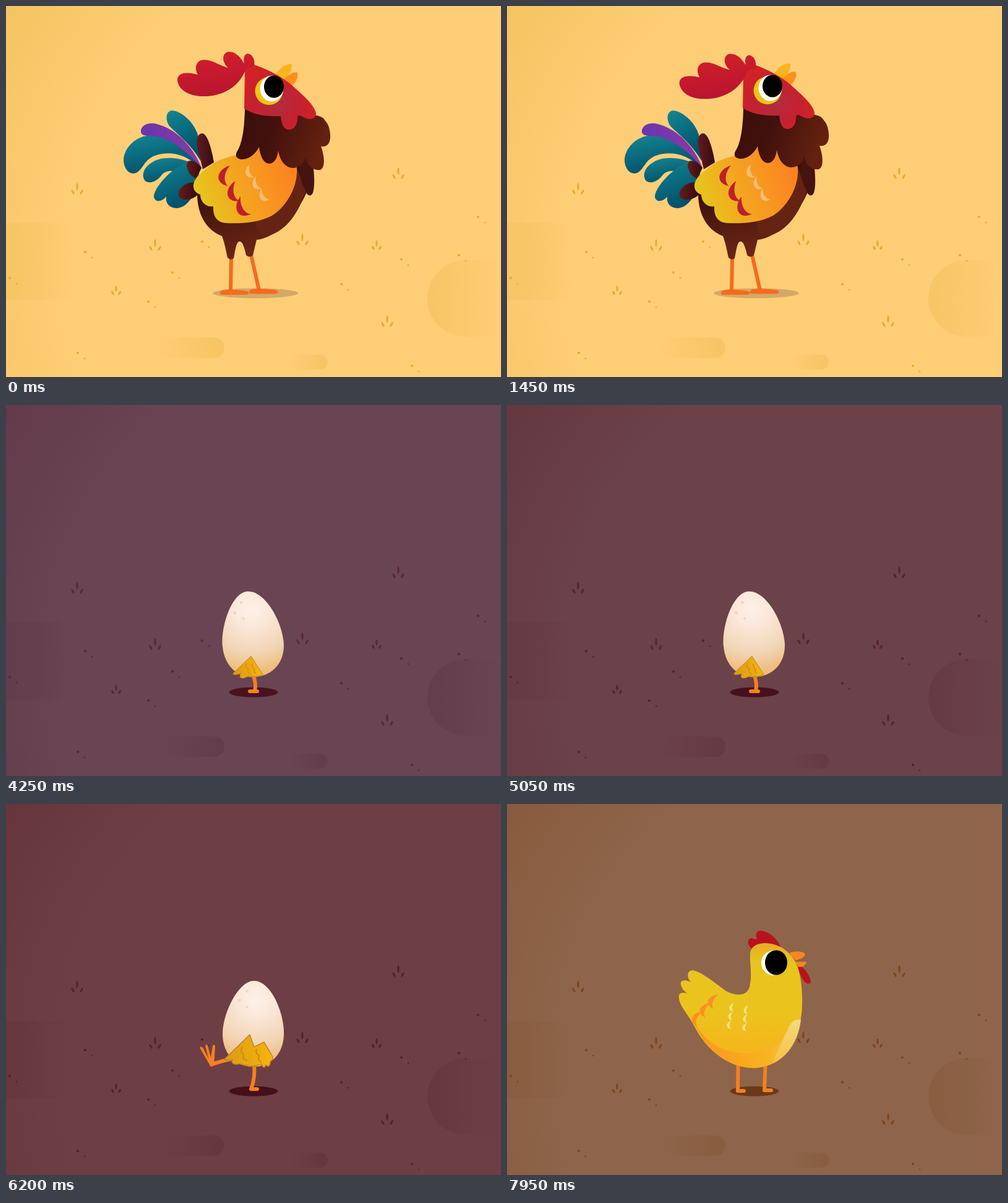
Recreate the animation shown at these times as an HTML page. Size 800 by 600 pixels, loop 8000 ms.

```html
<!DOCTYPE html>
<html lang="en">
<head>
<meta charset="utf-8">
<title>Rooster, egg, hen</title>
<style>
html, body { margin: 0; width: 100%; height: 100%; overflow: hidden; }
svg { display: block; width: 800px; height: 600px; background: var(--ground); }
.edge { stop-color: var(--edge); }
.patch { stop-color: var(--patch); }
#marks { fill: var(--mark); }
#shade { fill: var(--shade); }
.leg { fill: none; stroke: #f5801f; stroke-width: 6; stroke-linecap: round; stroke-linejoin: round; }
</style>
</head>
<body>
<svg id="stage" viewBox="0 0 800 600">
<defs>
  <radialGradient id="vignette" gradientUnits="userSpaceOnUse" cx="620" cy="420" r="760">
    <stop class="edge" offset=".7" stop-opacity="0"/><stop class="edge" offset="1"/>
  </radialGradient>
  <linearGradient id="fadeR"><stop class="patch" offset="0"/><stop class="patch" offset="1" stop-opacity="0"/></linearGradient>
  <linearGradient id="fadeL"><stop class="patch" offset="0" stop-opacity="0"/><stop class="patch" offset=".9"/></linearGradient>
  <linearGradient id="teal" x2=".4" y2="1"><stop offset="0" stop-color="#168692"/><stop offset="1" stop-color="#00516c"/></linearGradient>
  <linearGradient id="violet"><stop offset="0" stop-color="#6a35ae"/><stop offset="1" stop-color="#8a3aa4"/></linearGradient>
  <linearGradient id="plume"><stop offset="0" stop-color="#651b1c"/><stop offset="1" stop-color="#330c11"/></linearGradient>
  <linearGradient id="belly" x2=".3" y2="1"><stop offset=".3" stop-color="#360c0c"/><stop offset="1" stop-color="#6b2614"/></linearGradient>
  <linearGradient id="wing" gradientUnits="userSpaceOnUse" x1="305" y1="320" x2="460" y2="262"><stop offset="0" stop-color="#e4cb1c"/><stop offset=".45" stop-color="#f4a520"/><stop offset="1" stop-color="#fc8320"/></linearGradient>
  <linearGradient id="ruff" x2="1" y2=".25"><stop offset="0" stop-color="#3a0d0c"/><stop offset=".45" stop-color="#42110d"/><stop offset="1" stop-color="#64210f"/></linearGradient>
  <radialGradient id="face" cx=".45" cy=".6" r=".55"><stop offset="0" stop-color="#ae2f40"/><stop offset=".6" stop-color="#c52030"/><stop offset="1" stop-color="#d02326"/></radialGradient>
  <linearGradient id="crest" x2=".2" y2="1"><stop offset="0" stop-color="#d51f2b"/><stop offset="1" stop-color="#b9152f"/></linearGradient>
  <radialGradient id="shell" gradientUnits="userSpaceOnUse" cx="402" cy="352" r="112"><stop offset="0" stop-color="#fff0e7"/><stop offset=".25" stop-color="#fbe8da"/><stop offset=".65" stop-color="#f1d4b3"/><stop offset="1" stop-color="#efb468"/></radialGradient>
  <linearGradient id="down" x2="1"><stop offset="0" stop-color="#dc9a12"/><stop offset="1" stop-color="#f6b50d"/></linearGradient>
  <linearGradient id="plumage" x2="0" y2="1"><stop offset="0" stop-color="#e6ab25"/><stop offset=".15" stop-color="#e8c41f"/><stop offset=".55" stop-color="#ecc31d"/><stop offset="1" stop-color="#f9b01c"/></linearGradient>
  <linearGradient id="under"><stop offset="0" stop-color="#fb9420"/><stop offset=".6" stop-color="#f8ae1e"/><stop offset="1" stop-color="#f5c441"/></linearGradient>
  <linearGradient id="bib" x2="0" y2="1"><stop offset="0" stop-color="#f3d97d"/><stop offset="1" stop-color="#f6c244"/></linearGradient>
  <filter id="smear" x="-.1" y="-.1" width="1.2" height="1.2"><feGaussianBlur stdDeviation="1.2 2.4"/></filter>
  <path id="crescent" d="M0 0C-22 7 -25 30 -2 33C-10 27 -10 12 0 0Z"/>
</defs>

<rect width="800" height="600" fill="url(#vignette)"/>
<rect y="351" width="110" height="125" fill="url(#fadeR)"/>
<path d="M800 411H743a62 62 0 0 0 0 124H800Z" fill="url(#fadeR)"/>
<rect x="246" y="536" width="107" height="33" rx="16.5" fill="url(#fadeL)"/>
<rect x="458" y="564" width="62" height="24" rx="12" fill="url(#fadeL)"/>
<g id="marks"></g>
<ellipse id="shade" cy="464.5" ry="8"/>

<g id="rooster">
  <g fill="url(#teal)">
    <path d="M310 208C302 184 280 169 268 169C257 171 258 185 264 194C276 207 298 222 314 250Z"/>
    <path d="M316 262C300 236 270 212 238 209C210 208 190 230 190 250C191 267 202 273 210 270C221 265 222 251 238 243C262 233 290 238 314 262Z"/>
    <path d="M313 262C292 245 255 240 236 253C222 261 218 275 225 283C234 289 245 282 251 274C258 265 266 266 280 268Z"/>
    <path d="M296 250C262 265 238 297 239 309C241 318 252 317 259 308C257 320 265 327 277 327C291 325 298 314 306 300L314 262Z"/>
  </g>
  <path d="M316 262C305 232 278 198 240 190C226 188 217 195 218 204C220 213 236 208 251 213C277 221 300 243 316 262Z" fill="url(#violet)"/>
  <g fill="url(#plume)">
    <path d="M317 206C308 206 306 220 312 240L318 264L336 253C333 234 326 206 317 206Z"/>
    <path d="M316 262C304 246 291 248 292 259C294 269 299 276 307 279Z"/>
    <path d="M304 285C288 285 276 298 279 307C284 317 302 314 310 305Z"/>
  </g>
  <path class="leg" style="stroke:#f46b20" d="M364 408L363 461M396 402L409 460"/>
  <g fill="#f46b20">
    <path id="foot" d="M346 463C347 459 355 459 362 458C375 460 392 459 393 464Q392 467 387 467H350Q345 467 346 463Z"/>
    <use href="#foot" x="47" y="-1.5"/>
  </g>
  <path d="M309 300C308 338 325 363 349 372C354 385 356 399 358 407Q363 412 368 408C370 398 371 389 374 383Q378 378 382 384C385 390 387 398 388 403Q394 408 399 403L405 378C442 376 488 320 497 265L490 232H390Z" fill="url(#belly)"/>
  <path d="M404 349C402 363 412 373 426 371C452 363 474 335 484 298L470 262C468 305 450 336 404 349Z" fill="#652413"/>
  <path d="M478 245L494 244C498 262 500 290 496 302C493 309 487 308 483 297C476 282 470 262 478 245Z" fill="#461410"/>
  <path d="M303 289C305 276 319 267 333 256C352 243 378 242 400 230C432 222 468 240 470 262C472 292 454 324 430 339C408 351 380 352 355 351C341 350 334 340 335 324C325 326 314 318 314 305C306 303 302 296 303 289Z" fill="url(#wing)"/>
  <g id="wingRed" fill="#bf1f2a"></g>
  <g id="wingTan" fill="#f5bd72"></g>
  <g id="head">
    <path d="M386 160C386 200 381 224 373 236C369 244 375 248 382 248C395 248 405 236 409 228C411 244 417 255 426 255C435 254 439 244 440 234C443 252 453 262 464 262C476 261 483 253 484 243C486 258 497 267 508 265C517 261 514 240 509 227C520 229 525 220 524 208C523 196 520 190 516 186C512 178 505 178 497 176Z" fill="url(#ruff)"/>
    <path d="M434 114C440 103 449 93 462 94C463 103 457 113 449 120Z" fill="#f8b41d"/>
    <path d="M448 120C455 112 463 107 470 107C474 113 469 124 460 131Z" fill="#fb8f1c"/>
    <path d="M386 104C388 95 396 93 404 96C426 104 446 114 463 129C482 146 498 160 501 173C502 184 489 185 479 179Q471 174 471 182C471 192 466 200 457 200C448 200 445 188 444 178C420 179 400 176 385 166Z" fill="url(#face)"/>
    <circle cx="425" cy="137.5" r="22.5" fill="#f0c413"/>
    <ellipse cx="429.5" cy="133.5" rx="19" ry="21" fill="#fff"/>
    <ellipse cx="433" cy="130.5" rx="16" ry="18"/>
  </g>
  <path id="comb" d="M388 102C375 134 347 147 316 146C290 145 277 131 277 119C278 107 293 106 310 111C303 98 309 87 320 87C334 87 344 96 359 100C347 89 350 75 360 74C373 74 380 85 385 93C383 83 386 77 391 77C399 78 403 88 401 97Z" fill="url(#crest)"/>
</g>

<g id="egg">
  <g id="shellBox">
    <path d="M398 323C426 323 449 375 449 409C449 441 428 462 399 462C371 462 350 441 350 408C350 375 373 323 398 323Z" fill="url(#shell)"/>
    <g fill="#f0d6c2"><circle cx="387" cy="340" r="2.3"/><circle cx="375" cy="355.5" r="2.5"/><circle cx="388" cy="366" r="2"/></g>
  </g>
  <path id="legA" class="leg" d="M399 436Q405 450 402 462M394 463H406"/>
  <g id="crackA">
    <path d="M396 406L368 433C364 437 372 437 380 434C374 443 384 444 392 438Q404 441 415 436Z" fill="url(#down)" stroke="#b98438"/>
    <path d="M389 417Q386 424 392 427Q389 433 396 435M398 418Q397 425 402 428Q400 432 404 434" fill="none" stroke="#d8890f" stroke-width="1.5"/>
  </g>
  <g id="crackB">
    <g id="kick"><path class="leg" d="M366 379Q346 383 333 388"/><path d="M331 392L313 361Q315 358 318 361L327 378L322 358Q324 354 326 358L331 377L334 358Q337 354 338 359L336 390Z" fill="#f5801f"/></g>
    <path class="leg" d="M401 388Q403 410 396 428H406"/>
    <path d="M394 340L353 380Q360 382 366 380C363 388 371 389 377 387Q388 391 400 391L413 388Q417 397 420 389Q426 395 427 384Q433 380 430 374L417 352L401 360Z" fill="url(#down)" stroke="#c1812b" stroke-width="1.5"/>
    <path d="M382 360Q377 368 384 372Q381 380 390 382M405 363Q402 370 409 374Q406 381 413 385" fill="none" stroke="#d58a0c" stroke-width="2"/>
  </g>
</g>

<g id="hen">
  <path class="leg" d="M373.5 422L373 464H383M417.5 422L416 463H427"/>
  <path d="M397 235C387 229 388 217 395 217L404 219C400 209 405 204 411 205C425 207 436 217 442 230L420 240Z" fill="#b8131d"/>
  <path d="M466 258C480 262 490 277 491 288C488 294 480 289 476 280Z" fill="#b8131d"/>
  <path d="M456 241C466 237 479 238 482 243C481 248 474 251 466 253ZM466 255L484 255C482 262 477 265 470 263Z" fill="#fa8620"/>
  <path d="M393 240C395 230 405 225 417 225C445 226 463 243 471 267C478 292 479 330 474 352C467 396 440 426 398 427C355 426 320 395 302 358C292 338 276 325 278 309C280 304 287 305 291 306C282 300 278 289 283 286C288 284 293 286 297 288C289 279 292 268 301 269C318 273 340 293 355 303C375 313 392 309 393 290C396 275 392 256 393 240Z" fill="url(#plumage)"/>
  <path d="M301 352C322 387 350 403 387 403C420 403 440 390 450 373L474 352C467 396 440 426 398 427C355 426 320 395 301 352Z" fill="url(#under)"/>
  <path d="M475 349C465 347 458 353 453 366C445 385 438 396 430 419C455 408 471 382 475 349Z" fill="url(#bib)"/>
  <g id="tailMarks" fill="#fa9022"></g>
  <g id="wingMarks" fill="#f7df87"></g>
  <circle cx="431" cy="257" r="20" fill="#fff"/>
  <ellipse cx="435" cy="256.5" rx="18" ry="20"/>
</g>
</svg>
<script>
const $ = id => document.getElementById(id);
const set = (id, name, value) => $(id).setAttribute(name, value);
const show = (id, on) => { $(id).style.display = on ? '' : 'none'; };
const lerp = (a, b, u) => a + (b - a) * u;
const LOOP = 8000, STEP = 50;

// Tufts are fans of three blades; pebbles come with a smaller one beside them
const tuft = ([x, y, size = 1]) => [-1, 0, 1].map(i =>
  `<ellipse rx="1.7" ry="${(6 - Math.abs(i) * 1.8) * size}" transform="translate(${x + i * 7 * size} ${y + Math.abs(i) * 9 * size}) rotate(${i * 28})"/>`).join('');
const pebble = ([x, y]) => `<circle cx="${x}" cy="${y}" r="2.1"/><circle cx="${x + 11}" cy="${y + 9}" r="1.3"/>`;
$('marks').innerHTML =
  [[115, 292], [634, 267], [241, 383], [479, 374], [178, 457, .8], [599, 384, .8], [616, 506]].map(tuft).join('') +
  [[128, 398], [6, 440], [269, 431], [230, 478], [317, 381], [116, 561], [542, 450], [639, 410], [732, 403], [763, 341], [656, 582]].map(pebble).join('');

// A row of crescents, each moved and turned a little further than the last
function crescents(id, x, y, dx, dy, scale, turn, dTurn) {
  for (let i = 0; i < 3; i++) {
    $(id).innerHTML += `<use href="#crescent" transform="translate(${x + i * dx} ${y + i * dy}) rotate(${turn + i * dTurn}) scale(${scale})"/>`;
  }
}
crescents('wingRed', 362, 258, 8.5, 25, 1, 2, -18);
crescents('wingTan', 394, 256, 9.5, 19.5, .66, -22, -9);
crescents('tailMarks', 342, 308, -13, 14, .75, 16, 0);
crescents('wingMarks', 367, 322, -2, 14, .42, 0, 0);
crescents('wingMarks', 390, 326, -1, 14, .42, 0, 0);

const themes = {
  ground: ['#fdce76', '#67485f', '#694452', '#6d3f45', '#8e654b'],
  mark: ['#e7ab30', '#503149', '#57283a', '#552229', '#7c451f'],
  shade: ['#d5a965', '#43203a', '#471320', '#45101a', '#6b3919']
};
const rgb = hex => [1, 3, 5].map(i => parseInt(hex.slice(i, i + 2), 16));
const mix = (a, b, u) => a.map((c, i) => lerp(c, b[i], u));

function paint(theme) {
  const n = Math.min(3, Math.floor(theme));
  const pick = name => mix(rgb(themes[name][n]), rgb(themes[name][n + 1]), theme - n);
  const ground = pick('ground'), mark = pick('mark'), shade = pick('shade');
  const colors = { ground, mark, shade, edge: mix(ground, mark, .35), patch: mix(ground, mark, .26) };
  for (const name in colors) {
    $('stage').style.setProperty('--' + name, `rgb(${colors[name].map(Math.round)})`);
  }
}

function ease(t, from, to) {
  const u = Math.min(1, Math.max(0, (t - from) / (to - from)));
  return u * u * (3 - 2 * u);
}
function arc(t, from, to) {
  const u = (t - from) / (to - from);
  return u > 0 && u < 1 ? 4 * u * (1 - u) : 0;
}
// Damped swing that begins at a given time
function ring(t, from, period, decay) {
  const d = t - from;
  return d > 0 ? Math.sin(2 * Math.PI * d / period) * Math.exp(-d / decay) : 0;
}

function draw(t) {
  const toEgg = ease(t, 1800, 2050), toHen = ease(t, 6350, 6450);
  const popA = ease(t, 3400, 3600), popB = ease(t, 5450, 5600);
  const hop = arc(t, 5600, 5900), jump = arc(t, 6350, 6850);

  paint(toEgg + ease(t, 3400, 4200) + ease(t, 4600, 5400) + ease(t, 6350, 6600));
  const alpha = { rooster: 1 - toEgg, egg: toEgg * (1 - toHen), hen: toHen };
  for (const name in alpha) {
    set(name, 'opacity', alpha[name]);
    show(name, alpha[name] > 0);
  }

  const sway = ease(t, 0, 1450);
  set('head', 'transform', `translate(${-4 * sway} ${-sway})`);
  set('comb', 'transform', `translate(${sway} ${2.5 * sway}) rotate(${-1.5 * sway} 388 100)`);

  const lift = 22 * popA + 15 * popB;
  const y = -lift - 33 * hop;
  const tilt = -8 * ring(t, 2200, 500, 200) - 5.5 * popA + 12.5 * ease(t, 5450, 5750) - 7 * ease(t, 5950, 6350);
  set('shellBox', 'transform', `translate(0 ${y}) rotate(${tilt} 399 ${lift ? 410 : 462})`);
  set('crackA', 'transform', `translate(0 ${y + 22})`);
  set('legA', 'transform', `translate(0 466) scale(1 ${popA}) translate(0 -466)`);
  set('crackB', 'transform', `translate(0 ${y + 70})`);
  const kick = ease(t, 5450, 5650);
  set('kick', 'transform', `translate(364 379) rotate(${-60 * (1 - kick)}) scale(${kick}) translate(-364 -379)`);
  for (const id of ['crackA', 'legA']) show(id, popA && !popB);
  show('crackB', popB);

  const squash = .07 * ring(t, 6850, 200, 80);
  set('hen', 'transform', `translate(400 ${466 - 52 * jump}) scale(${1 + squash / 2} ${1 - squash}) translate(-400 -466)`);
  $('hen').style.filter = jump && t > 6650 ? 'url(#smear)' : '';

  set('shade', 'cx', lerp(403, 400, toEgg));
  set('shade', 'rx', lerp(69, 39.5, toEgg) - 4 * hop - jump);
}

const start = performance.now();
function tick(now) {
  const t = Math.max(0, now - start) % LOOP;
  draw(Math.floor(t / STEP) * STEP);
  requestAnimationFrame(tick);
}
draw(0);
requestAnimationFrame(tick);
</script>
</body>
</html>
```
